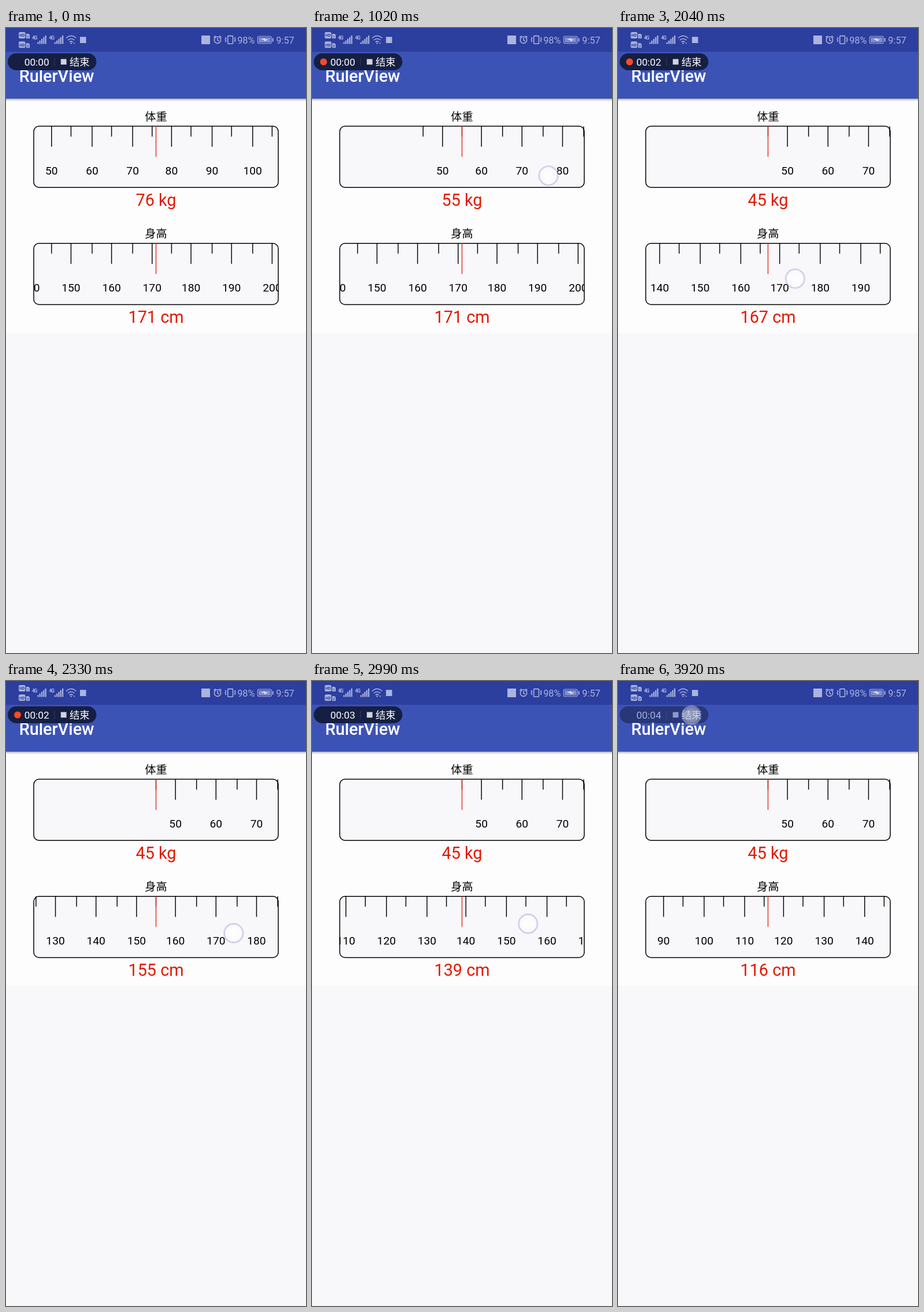
Animation, 519 px wide and 1079 px high, one loop 3950 ms. Source, as an HTML page:

```html
<!DOCTYPE html>
<html lang="zh-CN">
<head>
<meta charset="utf-8">
<title>RulerView</title>
<style>
html, body { margin: 0; width: 100%; height: 100%; overflow: hidden; background: #f8f7fa; }
svg { display: block; width: 100%; height: 100%; }
text { font-family: Roboto, "Noto Sans CJK SC", "Noto Sans CJK", sans-serif; }
.mid { text-anchor: middle; }
.name { font-size: 19.2px; }
.num { font-size: 19.2px; text-anchor: middle; }
.value { font-size: 28.8px; fill: #e01a02; text-anchor: middle; }
.status { font-size: 16.3px; }
</style>
</head>
<body>
<svg id="stage" viewBox="0 0 519 1079" preserveAspectRatio="none">
  <defs>
    <linearGradient id="shade" x1="0" y1="0" x2="0" y2="1">
      <stop offset="0" stop-color="#8f93ad" stop-opacity=".75"/>
      <stop offset="1" stop-color="#c8c8d4" stop-opacity="0"/>
    </linearGradient>
    <radialGradient id="glow">
      <stop offset="0" stop-color="#fff" stop-opacity=".78"/>
      <stop offset=".7" stop-color="#fff" stop-opacity=".66"/>
      <stop offset="1" stop-color="#f4f2fc" stop-opacity=".45"/>
    </radialGradient>
    <clipPath id="inside"><rect x="47.3" y="0" width="424.2" height="1079"/></clipPath>
  </defs>
  <rect width="519" height="1079" fill="#f8f7fa"/>
  <rect y="122" width="519" height="404" fill="#fefdfe"/>
  <rect y="122" width="519" height="5" fill="url(#shade)"/>
  <rect y="40" width="519" height="82" fill="#3c53b6"/>
  <rect width="519" height="41" fill="#2c3e9e"/>

  <g id="icons" fill="#abb4df">
    <g id="hd">
      <rect x="22" y="7" width="11.5" height="11" rx="2.5"/>
      <text class="mid" x="27.8" y="15.3" font-size="7" font-weight="700" fill="#2c3e9e">HD</text>
      <path d="M35 10h4l2 2v6h-6z"/>
      <text class="mid" x="38" y="16.6" font-size="6" font-weight="700" fill="#2c3e9e">1</text>
    </g>
    <g transform="translate(0 16.3)">
      <rect x="22" y="7" width="11.5" height="11" rx="2.5"/>
      <text class="mid" x="27.8" y="15.3" font-size="7" font-weight="700" fill="#2c3e9e">HD</text>
      <path d="M35 10h4l2 2v6h-6z"/>
      <text class="mid" x="38" y="16.6" font-size="6" font-weight="700" fill="#2c3e9e">2</text>
    </g>
    <g id="bars"></g>
    <g fill="none" stroke="#abb4df" stroke-width="1.6">
      <path d="M104 17.5q8.7-8 17.4 0M107 21q5.7-5 11.4 0M110 24.3q2.7-2.4 5.4 0"/>
      <circle cx="366" cy="20.7" r="5.7"/>
      <path d="M366 17v4l2.8 1.8M359.4 16.2l3.3-2.7M372.6 16.2l-3.3-2.7"/>
      <rect x="383.7" y="13.6" width="8.8" height="13.6" rx="1.2"/>
      <path d="M379.2 16l1.5 2-1.5 2 1.5 2-1.5 2M397 16l-1.5 2 1.5 2-1.5 2 1.5 2" stroke-width="1.4"/>
      <rect x="435.3" y="14.2" width="23.8" height="12.6" rx="2.5" stroke-width="1.1"/>
    </g>
    <circle cx="112.7" cy="26.6" r="1.2"/>
    <circle cx="117.8" cy="26.3" r="1.1"/>
    <rect x="128" y="15.3" width="10.5" height="10.7"/>
    <rect x="338" y="13" width="15" height="15"/>
    <rect x="437" y="16" width="20.4" height="9" rx="1" fill="#7f8bcb"/>
    <path d="M441 20l7-2.2v2h6l-7 3v-2.2z" fill="#eef0fb"/>
    <rect x="460.7" y="17.5" width="1.9" height="6"/>
    <text class="status" x="400.2" y="26.5">98%</text>
    <text class="status" x="467.3" y="26.5">9:57</text>
  </g>

  <text x="22.7" y="92.6" font-size="28.8" font-weight="500" fill="#fff">RulerView</text>

  <g id="pill">
    <rect x="3" y="43.7" width="153.4" height="29.2" rx="14.6" fill="#151f43"/>
    <circle id="dot" cx="20" cy="58.4" r="6" fill="#fb4a26"/>
    <text id="clock" x="31.7" y="65" font-size="17.3" fill="#fff"></text>
    <path d="M84 51.5v14" stroke="#35405f"/>
    <rect x="94.8" y="53.6" width="9.8" height="9.6" fill="#d3d5dc"/>
    <text x="110" y="65.1" font-size="17.3" fill="#fff">结束</text>
  </g>

  <g id="rulers"></g>

  <g id="touch">
    <circle r="16.4" fill="none" stroke="#a9a4dc" stroke-opacity=".22" stroke-width="3.2"/>
    <circle r="16" fill="url(#glow)" stroke="#b9b3e0" stroke-opacity=".65" stroke-width="1.6"/>
  </g>
</svg>
<script>
const LOOP = 3950, CENTER = 259.5;
const PX = 519 / 1080, STEP = 14 * PX, GAP = 6 * PX;
const $ = id => document.getElementById(id);

function add(parent, tag, attrs, text) {
  const el = document.createElementNS('http://www.w3.org/2000/svg', tag);
  for (const key in attrs) el.setAttribute(key, attrs[key]);
  if (text !== undefined) el.textContent = text;
  parent.appendChild(el);
  return el;
}

// Linear interpolation through rows of [time, a, b, ...]
function along(rows, t) {
  if (t <= rows[0][0]) return rows[0].slice(1);
  for (let i = 1; i < rows.length; i++) {
    const p = rows[i - 1], q = rows[i];
    if (t <= q[0]) {
      const k = (t - p[0]) / (q[0] - p[0]);
      return p.slice(1).map((v, j) => v + (q[j + 1] - v) * k);
    }
  }
  return rows[rows.length - 1].slice(1);
}

const weightPath = [[200, 76], [510, 67], [1020, 55], [1430, 45]];
const heightPath = [[1860, 171], [2040, 167], [2400, 151], [2660, 151],
  [2770, 149], [3230, 127], [3370, 127], [3410, 126], [3680, 116]];

const gestures = [
  [[170, 275, 222], [510, 336, 232], [1020, 412, 256], [1430, 461, 266], [1520, 461, 266]],
  [[1820, 281, 430], [2040, 309, 433], [2400, 418, 436], [2460, 420, 436]],
  [[2620, 293, 416], [2770, 308, 420], [3230, 452, 418], [3270, 454, 418]],
  [[3340, 284, 424], [3410, 291, 425], [3680, 358, 428], [3720, 358, 428]],
  [[3850, 127, 59], [3950, 127, 59]]
];

// Every tenth unit away from the pointer is set slightly wider
function tickX(n) {
  const wide = n < 0 ? -Math.floor((-n - 1) / 10) : Math.floor(n / 10);
  return CENTER + n * STEP + wide * GAP;
}

function makeRuler(top, name, unit, min, max) {
  const g = add($('rulers'), 'g', { transform: `translate(0 ${top})` });
  add(g, 'text', { class: 'name mid', x: CENTER, y: -9.2 }, name);
  add(g, 'rect', { x: 48, y: .2, width: 423, height: 105.6, rx: 9,
    fill: '#f8f7fa', stroke: '#000', 'stroke-width': 1.5 });
  const scale = add(g, 'g', { 'clip-path': 'url(#inside)' });
  add(g, 'path', { d: `M${CENTER} 0V53`, stroke: '#d93a28', 'stroke-width': 1.5 });
  const value = add(g, 'text', { class: 'value', x: CENTER, y: 137.4 });
  let shown;
  return v => {
    if (v === shown) return;
    shown = v;
    value.textContent = `${v} ${unit}`;
    scale.textContent = '';
    for (let mark = min; mark <= max; mark += 5) {
      const x = tickX(mark - v);
      if (x < 25 || x > 494) continue;
      const major = mark % 10 === 0;
      add(scale, 'path', { d: `M${x} 0V${major ? 35.7 : 18}`, stroke: '#000', 'stroke-width': 1.45 });
      if (major) add(scale, 'text', { class: 'num', x, y: 83.6 }, mark);
    }
  };
}

for (const x of [45, 74.5]) {
  add($('bars'), 'text', { x, y: 19.6, 'font-size': 8.4, 'font-weight': 700,
    textLength: 9.5, lengthAdjust: 'spacing' }, '4G');
  for (let i = 0; i < 5; i++) {
    const h = 3 + i * 2.9;
    add($('bars'), 'rect', { x: x + 9.3 + i * 3.3, y: 27.5 - h, width: 2.2, height: h });
  }
}

const setWeight = makeRuler(169.4, '体重', 'kg', 45, 150);
const setHeight = makeRuler(371.6, '身高', 'cm', 80, 230);

function draw(time) {
  const t = time < 160 ? 0 : 160 + 30 * Math.floor((time - 160) / 30 + 1e-6);
  setWeight(Math.round(along(weightPath, t)[0]));
  setHeight(Math.round(along(heightPath, t)[0]));

  const seconds = Math.max(0, Math.floor((t - 150) / 930));
  $('clock').textContent = '00:0' + seconds;
  const lit = t >= 160 && (t - 40) % 450 < 200;
  $('dot').style.display = lit ? '' : 'none';
  $('pill').setAttribute('opacity', t >= 3850 ? .53 : 1);

  const path = gestures.find(g => t >= g[0][0] && t <= g[g.length - 1][0]);
  $('touch').style.display = path ? '' : 'none';
  if (path) {
    const [x, y] = along(path, t);
    $('touch').setAttribute('transform', `translate(${x} ${y})`);
    $('touch').setAttribute('opacity', y < 100 ? .65 : 1);
  }
}

const start = performance.now();
function tick() {
  draw((performance.now() - start) % LOOP);
  requestAnimationFrame(tick);
}
draw(0);
requestAnimationFrame(tick);
</script>
</body>
</html>
```
